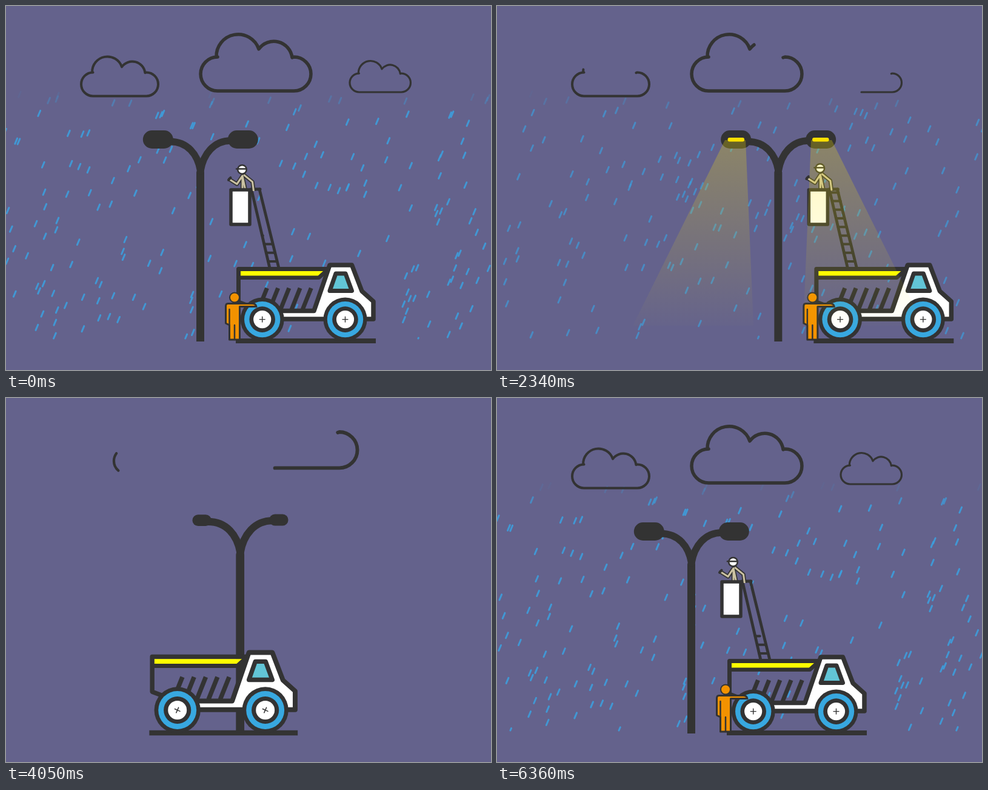
An HTML page with a canvas that plays this animation: 800x600 px, repeating every 6.39 s.

```html
<!DOCTYPE html>
<html lang="en">
<head>
<meta charset="utf-8">
<title>Street light repair</title>
<style>
html, body { margin: 0; height: 100%; overflow: hidden; background: #64628c; }
canvas { display: block; }
</style>
</head>
<body>
<canvas id="stage" width="800" height="600"></canvas>
<script>
const c = document.getElementById('stage').getContext('2d');
const LOOP = 6390, DARK = '#333333', BG = '#64628c';

// Piecewise linear value through time/value pairs.
function ramp(t, ...p) {
  if (t <= p[0]) return p[1];
  for (let i = 2; i < p.length; i += 2)
    if (t < p[i]) return p[i - 1] + (p[i + 1] - p[i - 1]) * (t - p[i - 2]) / (p[i] - p[i - 2]);
  return p[p.length - 1];
}
const easeOut = u => 1 - (1 - u) ** 3;
const rand = n => { const v = Math.sin(n * 127.1 + 11.7) * 43758.5453; return v - Math.floor(v); };

function stroke(d, width, color = DARK) {
  c.lineWidth = width;
  c.strokeStyle = color;
  c.stroke(new Path2D(d));
}
function shape(d, fill, width) {
  c.fillStyle = fill;
  c.fill(new Path2D(d));
  stroke(d, width);
}
function disc(x, y, r, fill) {
  c.fillStyle = fill;
  c.beginPath();
  c.arc(x, y, r, 0, 7);
  c.fill();
}
function pill(x, y, w, h, r, fill) {
  c.fillStyle = fill;
  c.beginPath();
  c.roundRect(x, y, w, h, r);
  c.fill();
}
function group(draw) { c.save(); draw(); c.restore(); }

// Strokes only the part of a path from start to start + part (fractions of its length).
function partial(d, length, start, part, width) {
  if (part <= 0) return;
  c.setLineDash(part < 1 ? [part * length, (1 - part) * length] : []);
  c.lineDashOffset = -start * length;
  stroke(d, width);
  c.setLineDash([]);
}

const CLOUD = 'M472 85L475 84A28 28 0 0 1 475 140H349A28 28 0 0 1 349 84L347 84A36 36 0 0 1 417 71A30.5 30.5 0 0 1 472 85';
function cloud(x, bottom, size, start, part, width) {
  group(() => {
    c.translate(x, bottom);
    c.scale(size, size);
    c.translate(-321, -140);
    partial(CLOUD, 482.4, start, part, width / size);
  });
}
function clouds(t) {
  const gone = from => ramp(t, from + LOOP, 1, from + LOOP + 720, 0);
  const later = t >= LOOP;
  const put = (x, y, size, width, start, part, eraseAt) =>
    cloud(x, y, size, later ? 0 : start, later ? gone(eraseAt) : part, width);
  put(124, 148.5, 0.698, 4,
    ramp(t, 3940, 0.4, 4050, 0.488, 4200, 0.66, 5070, 1.27),
    ramp(t, 3940, 0, 4050, 0.087, 5070, 0.83, 5280, 1), 2088);
  put(321, 140, 1, 5.5,
    ramp(t, 3650, -0.4, 4050, 0, 5070, 1.042),
    ramp(t, 3650, 0, 4050, 0.395, 5070, 0.973, 5150, 1), 2246);
  put(567, 142, 0.552, 3.2,
    ramp(t, 4350, 0.28, 5070, 0.76, 5700, 1),
    ramp(t, 4350, 0, 5070, 0.537, 5700, 1), 1894);
}

function rain(t) {
  const strength = ramp(t, 4660, 0, 5350, 1, LOOP + 2200, 1, LOOP + 2800, 0);
  if (!strength) return;
  for (let i = 0; i < 225; i++) {
    const life = t / 1400 + rand(i), turn = Math.floor(life), u = life - turn;
    const x = rand(i * 7.3 + turn * 31.7) * 940 - u * 130, y = 138 + u * 410;
    const len = Math.min(9, 548 - y);
    c.globalAlpha = strength * Math.min(1, u * 12) * 0.9;
    stroke(`M${x} ${y}l${-len * 0.42} ${len}`, 3, '#3d9ddc');
  }
  c.globalAlpha = 1;
}

function lamp(t) {
  const h = ramp(t, 3240, 0, 3330, 69, 3620, 285);
  pill(314, 553 - h, 13, h, [Math.min(6.5, h), Math.min(6.5, h), 0, 0], DARK);
  const arm = ramp(t, 3600, 0, 3880, 1);
  const head = ramp(t, 3920, 0, 4050, 0.59, 4220, 1);
  for (const side of [1, -1]) group(() => {
    const y = side < 0 ? 223.5 : 222; // the left arm hangs slightly lower
    c.translate(320.8, 0);
    c.scale(side, 1);
    partial(`M0 272C4.500 244 22 ${y} 50 ${y}`, 76, 0, arm, 11.5);
    c.translate(45, y);
    c.scale(head, head);
    pill(0, 205 - y, 50, 30, 15, DARK);
  });
}

function lights(t) {
  const k = t - LOOP;
  const right = ramp(k, 450, 0, 480, 0.8, 540, 0.1, 600, 0.7, 660, 0.3, 760, 1);
  const left = ramp(k, 840, 0, 870, 0.5, 930, 0.1, 990, 0.36, 1080, 0.1, 1140, 0.8, 1200, 0.3, 1300, 1);
  const beam = c.createLinearGradient(0, 222, 0, 527);
  beam.addColorStop(0, 'rgba(255,232,0,.26)');
  beam.addColorStop(1, 'rgba(255,232,0,.01)');
  [[1, right], [-1, left]].forEach(([side, on]) => group(() => {
    c.translate(320.7, 0);
    c.scale(side, 1);
    c.globalAlpha = Math.max(0, on * 2 - 1);
    c.fillStyle = beam;
    c.fill(new Path2D('M54 221H88L240 527H41Z'));
    c.globalAlpha = on;
    pill(56, 217, 27.5, 6.5, 3, '#ffe000');
  }));
}

function boom(t) {
  const rails = easeOut(ramp(t, 5450, 0, 5850, 1));
  if (!rails) return;
  partial('M435 432L405 303', 133, 0, rails, 4.8);
  partial('M450 432L418 302', 134, 0, rails, 4.8);
  for (let i = 0; i < 9; i++) {
    const y = 421 - 14.2 * i, from = 6218 + 56 * i, part = ramp(t, from, 0, from + 56, 1);
    const x = 405 + (y - 303) * 0.233;
    if (part) stroke(`M${x} ${y}h${14 * part}`, 4);
  }
  if (rails > 0.98) stroke('M404 302H419', 5);

  const up = easeOut(ramp(t, 5980, 0, 6600, 1));
  if (up) group(() => {
    c.beginPath();
    c.rect(350, 200, 80, 105);
    c.clip();
    c.translate(0, 48 * (1 - up) - 1.9);
    worker();
  });
  const open = easeOut(ramp(t, 5780, 0, 6000, 1));
  if (open) shape(`M371 303H402V${303 + 57 * open}H371Z`, '#fff', 5.5);
}

function worker() {
  const limbs = 'M369 286L381 293.500L390 280L395 304M390 281V304M393 279L406.500 290L408.500 305';
  stroke(limbs, 6.5);
  stroke(limbs, 3, '#cbc2a2');
  stroke('M367 287l3.500-4', 4);
  disc(389.5, 269.5, 8.5, DARK);
  disc(389.5, 269.5, 6, '#fff');
  stroke('M380 268.500H396', 2.5);
}

function truck(travel) {
  c.fillStyle = DARK;
  c.fillRect(379, 548, 231, 8);
  stroke('M405 496L383.500 488V433.500H531', 7);
  c.fillStyle = '#ffff00';
  c.fill(new Path2D('M387 437H525L516 445H387Z'));
  stroke('M384 447.700H516L528 437', 6.5);
  for (let i = 0; i < 5; i++) {
    const x = 430.5 + 18.2 * i;
    c.lineCap = 'butt';
    stroke(`M${x} 465l-14 35`, 7);
    c.lineCap = 'round';
  }
  shape('M534 427H570.500L587 470L606 487V516H440V502.500H508Z', '#fff', 7.5);
  shape('M544 441H560L570.500 469.500H534Z', '#62c5d6', 7);
  for (const x of [422.7, 559.5]) group(() => {
    c.translate(x, 516.6);
    disc(0, 0, 36, DARK);
    disc(0, 0, 29.7, '#38a8e0');
    disc(0, 0, 21.3, DARK);
    disc(0, 0, 14.6, '#fff');
    c.rotate(travel / 34.1);
    stroke('M-4.500 0H4.500M0-4.500V4.500', 1.4);
  });
}

function helper(t) {
  if (t < 5030) return;
  group(() => {
    c.beginPath();
    c.rect(327, 450, 120, 110);
    c.clip();
    c.translate(ramp(t, 5030, -86, 5070, -75.5, 5250, -32, 5380, -10, 5520, 0), 0);
    shape('M366 490.500H406Q412 490.500 413 495.500H385.500V550H368.500V526L362.500 523V495Q362.500 490.500 366 490.500Z', '#f39200', 3);
    stroke('M368.500 500V526M377 526V550', 2.5);
    disc(377, 480.5, 9, DARK);
    disc(377, 480.5, 7, '#f39200');
  });
}

function draw(now) {
  let t = now % LOOP;
  if (t < 3200) t += LOOP; // the scene builds up, wraps round and then drives away
  const zoom = 0.256 * (Math.max(0, 6186 - t) / 2856) ** 5;
  const travel = -544.2 * (Math.max(0, 6084 - t) / 2754) ** 3.3;
  const pan = 0.0011 * Math.max(0, t - LOOP - 1980) ** 2;

  c.fillStyle = BG;
  c.fillRect(0, 0, 800, 600);
  c.lineCap = c.lineJoin = 'round';
  group(() => {
    c.translate(765 * zoom + 228 * zoom * zoom, 552);
    c.scale(1 + zoom, 1 + zoom);
    c.translate(0, -552);
    rain(t);
    clouds(t);
    c.translate(pan, 0);
    lamp(t);
    group(() => {
      c.translate(travel, 0);
      boom(t);
      truck(travel);
    });
    helper(t);
    lights(t);
  });
}

const begin = performance.now();
function tick() {
  draw(performance.now() - begin);
  requestAnimationFrame(tick);
}
tick();
</script>
</body>
</html>
```
